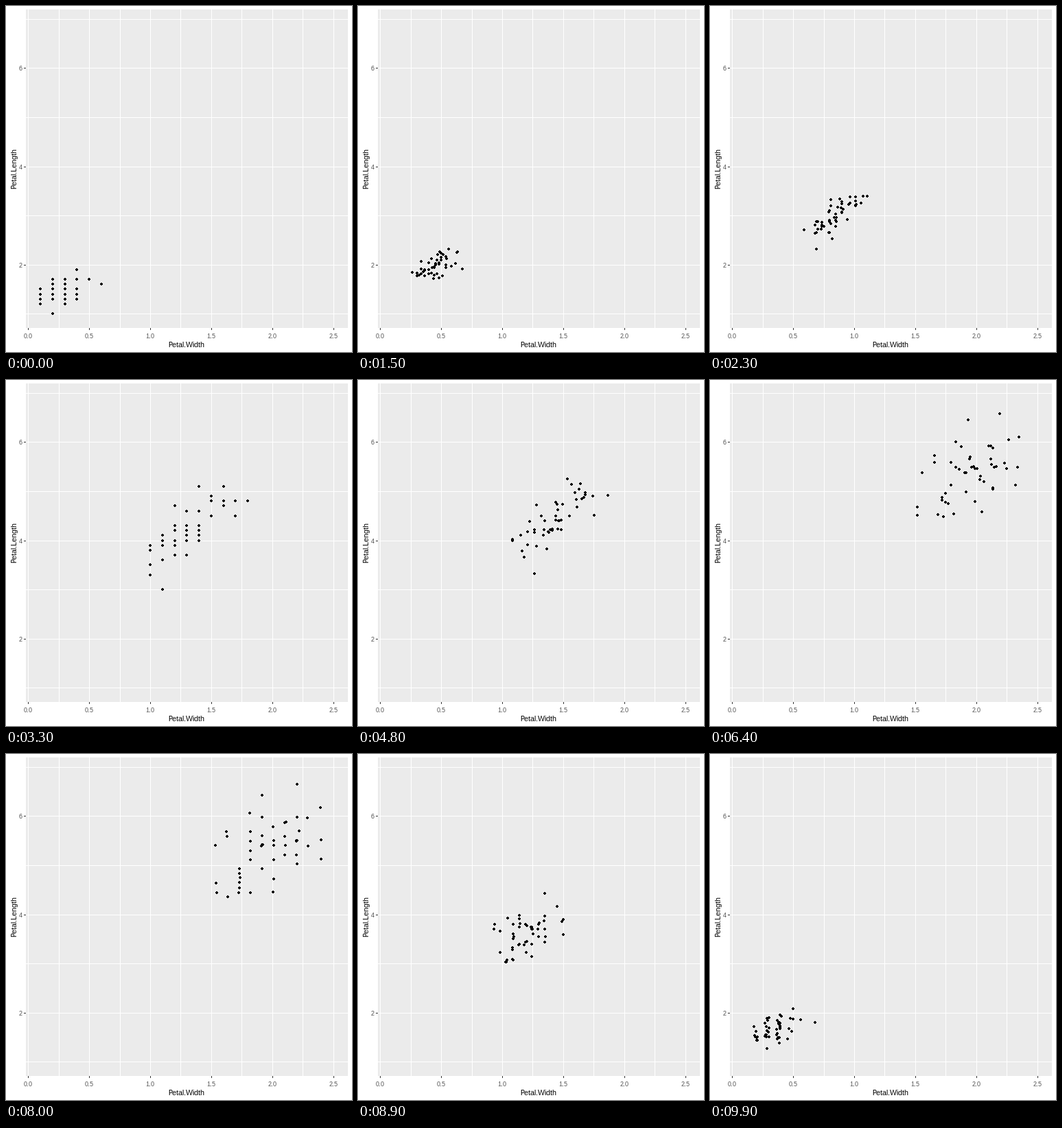
Animation of 504x504 px, one loop 10000 ms. Source, as a matplotlib script:

```python
import matplotlib.pyplot as plt
import numpy as np
from matplotlib.animation import FuncAnimation
from matplotlib.collections import PolyCollection
from matplotlib.patches import Rectangle

plt.rcParams.update({"text.hinting": "native", "text.hinting_factor": 1})

SIZE, FRAMES, STEP_MS, COUNT = 504, 100, 100, 50
LEFT, TOP, RIGHT, BOTTOM = 29, 5, 498, 469
MOVES = [(11, 22), (45, 22), (79, 21)]  # first frame and length of each move

# Outer points as (width, length), one row per dot and one column per cluster.
KEYS = np.array([
    [(0.6, 1.6), (1.0, 3.3), (2.3, 5.9)],
    [(0.2, 1.7), (1.8, 4.8), (2.3, 5.7)],
    [(0.3, 1.7), (1.5, 4.5), (2.3, 6.9)],
    [(0.2, 1.5), (1.1, 3.0), (2.3, 5.4)],
    [(0.3, 1.4), (1.6, 4.7), (1.7, 4.5)],
    [(0.5, 1.7), (1.2, 4.7), (1.8, 4.9)],
    [(0.4, 1.9), (1.3, 4.2), (2.5, 5.7)],
    [(0.2, 1.0), (1.5, 4.9), (2.0, 6.7)],
])

rng = np.random.default_rng(7)


def px(w):
    return 32.2 + 177.8 * w


def py(l):
    return 520.25 - 71.55 * l


def cluster(keys, mean, sd, corr):
    """Correlated normal cloud on a 0.1 grid, led by the key points."""
    z = rng.normal(size=(COUNT - len(keys), 2))
    z = (z - z.mean(axis=0)) / z.std(axis=0)
    z[:, 1] = corr * z[:, 0] + np.sqrt(1 - corr ** 2) * z[:, 1]
    cloud = np.array(mean) + np.clip(z, -1.7, 1.7) * sd
    return np.vstack([keys, np.round(cloud, 1)])


GROUPS = [cluster(KEYS[:, 0], (0.24, 1.46), (0.09, 0.17), 0.33),
          cluster(KEYS[:, 1], (1.33, 4.26), (0.20, 0.47), 0.79),
          cluster(KEYS[:, 2], (2.03, 5.50), (0.27, 0.52), 0.32)]


def positions(n):
    pos = GROUPS[0]
    for i, (start, length) in enumerate(MOVES):
        t = np.clip((n - start) / length, 0, 1)
        pos = pos + (GROUPS[(i + 1) % 3] - GROUPS[i]) * t
    return pos


fig = plt.figure(figsize=(SIZE / 72, SIZE / 72), dpi=72, facecolor="white")
ax = fig.add_axes((0, 0, 1, 1))
ax.set(xlim=(0, SIZE), ylim=(SIZE, 0))
ax.axis("off")


def box(x, y, w, h, color):
    ax.add_patch(Rectangle((x, y), w, h, fc=color, lw=0, antialiased=False))


def label(x, y, text, size, color, ha="center", **kw):
    ax.text(x, y, text, size=size, color=color, ha=ha, va="baseline",
            family="Liberation Sans", **kw)


box(LEFT, TOP, RIGHT - LEFT, BOTTOM - TOP, "#EBEBEB")
for i in range(11):
    x = round(px(i / 4))
    box(x, TOP, 1, BOTTOM - TOP, "white")
    if i % 2 == 0:
        box(x, BOTTOM, 1, 3, "#333333")
        label(x, 484, f"{i / 4:.1f}", 9.4, "#4D4D4D")
for i in range(1, 8):
    y = int(py(i))
    box(LEFT, y, RIGHT - LEFT, 1, "white")
    if i % 2 == 0:
        box(LEFT - 3, y, 3, 1, "#333333")
        label(24, y + 4, str(i), 9.4, "#4D4D4D", ha="right")
label(262.5, 497, "Petal.Width", 10.6, "black")
label(15, 237, "Petal.Length", 10.6, "black", rotation=90,
      rotation_mode="anchor")

# A four-pixel dot with its corners cut.
DOT = np.array([(-1, -2), (1, -2), (1, -1), (2, -1), (2, 1), (1, 1),
                (1, 2), (-1, 2), (-1, 1), (-2, 1), (-2, -1), (-1, -1)])
dots = PolyCollection([], facecolors="black", linewidths=0, antialiaseds=False,
                      zorder=3)
ax.add_collection(dots, autolim=False)


def draw(n):
    w, l = positions(n).T
    centres = np.column_stack([np.round(px(w)), np.floor(py(l))])
    dots.set_verts(centres[:, None, :] + DOT)
    return (dots,)


anim = FuncAnimation(fig, draw, frames=FRAMES, interval=STEP_MS,
                     init_func=lambda: draw(0), repeat=True, repeat_delay=0)
plt.show()
```
